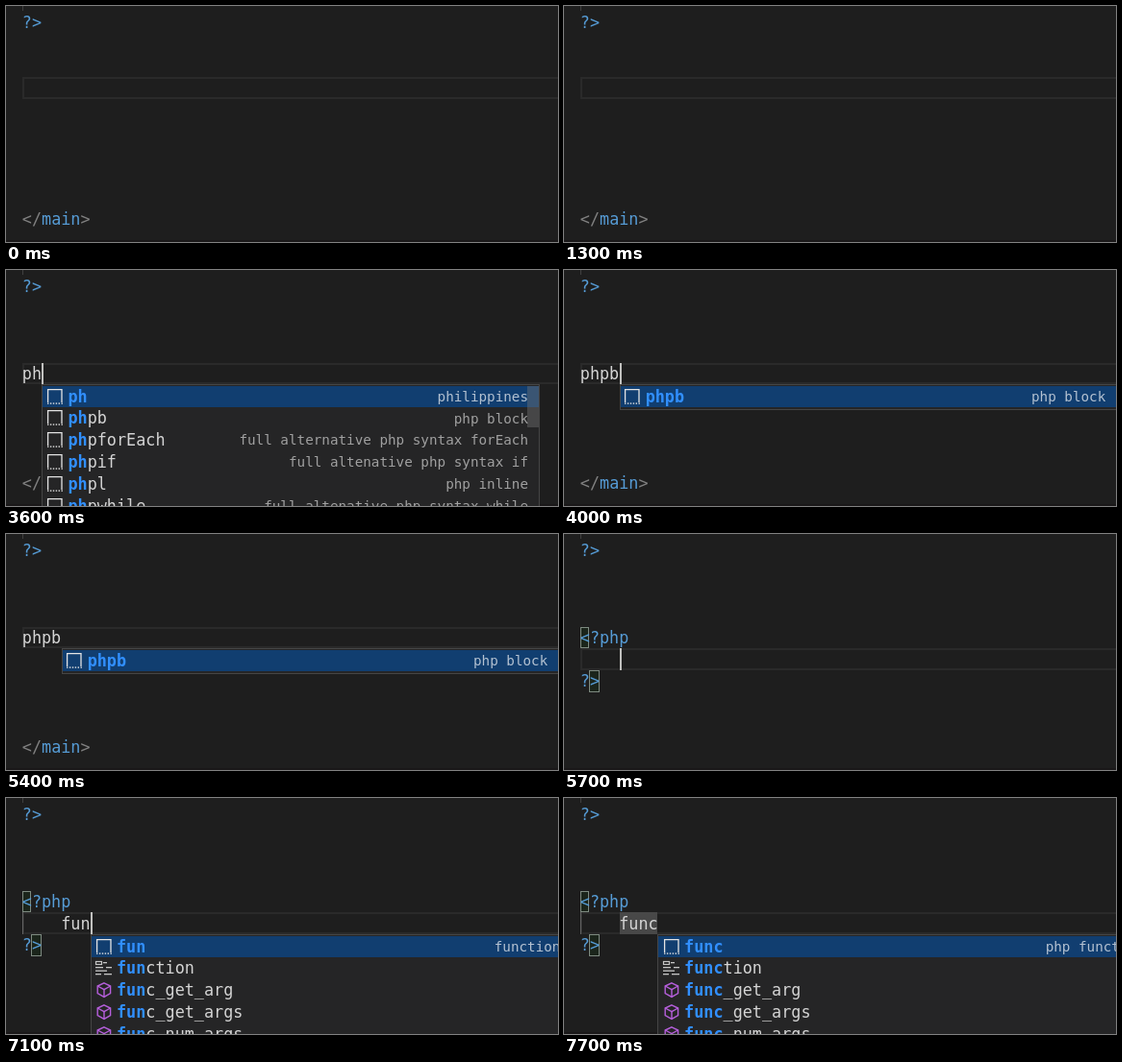
An HTML page with a canvas that plays this animation: 574 px wide and 246 px high, repeating every 8000 ms.

```html
<!DOCTYPE html>
<html lang="en">
<head>
<meta charset="utf-8">
<title>Editor snippets</title>
<style>
  html, body { margin: 0; width: 100%; height: 100%; overflow: hidden; background: #1e1e1e; }
  canvas { display: block; }
</style>
</head>
<body>
<canvas id="stage" width="574" height="246"></canvas>
<script>
const W = 574, H = 246, LOOP = 8000;
const ctx = document.getElementById('stage').getContext('2d');

const SIZE = 16.8, ADV = SIZE * 0.602, LINE = 22.8, LEFT = 16.8, TOP = 5.4;
const FAMILY = '"DejaVu Sans Mono", monospace';
const BLUE = '#569cd6', GREY = '#808080', TEXT = '#d4d4d4', MATCH = '#318fff';
const CARET_X = [17, 27, 37, 47, 58, 68, 78, 88, 97];

const phpItems = [
  ['phpb', 'php block'],
  ['phpforEach', 'full alternative php syntax forEach'],
  ['phpif', 'full altenative php syntax if'],
  ['phpl', 'php inline'],
  ['phpwhile', 'full altenative php syntax while']
];
const funItems = [
  ['function', '', 'keyword'],
  ['func_get_arg', '', 'cube'],
  ['func_get_args', '', 'cube'],
  ['func_num_args', '', 'cube']
];
const phList = [['ph', 'philippines'], ...phpItems];
const funList = [['fun', 'function()'], ...funItems];
const funcList = [['func', 'php function'], ...funItems];

// Each step replaces the fields it names
const steps = [
  { at: 0, line: 3, word: '', list: null, popCol: 0, bar: false,
    block: false, pair: false, guide: false, mark: false },
  { at: 1400, line: 5 },
  { at: 2600, line: 4 },
  { at: 3500, word: 'p' },
  { at: 3600, word: 'ph', list: phList, popCol: 2, bar: true },
  { at: 3700, word: 'php' },
  { at: 3800, list: phpItems, popCol: 3, bar: false },
  { at: 4000, word: 'phpb', list: phpItems.slice(0, 1), popCol: 4 },
  { at: 5600, line: 5, word: '', list: null, block: true },
  { at: 5700, pair: true },
  { at: 6800, word: 'f', guide: true },
  { at: 6900, word: 'fu' },
  { at: 7000, list: funList, popCol: 6 },
  { at: 7100, word: 'fun', popCol: 7 },
  { at: 7300, word: 'func', list: funcList, popCol: 8 },
  { at: 7500, mark: true }
];
const blinkStarts = [1400, 2600, 3500, 3900, 5600, 6800, 7200];

const lineTop = n => Math.round(TOP + n * LINE);

function rect(x, y, w, h, color) {
  ctx.fillStyle = color;
  ctx.fillRect(x, y, w, h);
}

function frame(x, y, w, h, color) {
  ctx.strokeStyle = color;
  ctx.lineWidth = 1;
  ctx.strokeRect(x + 0.5, y + 0.5, w - 1, h - 1);
}

function text(str, x, y, color, bold, size = SIZE) {
  ctx.font = `${bold ? 'bold ' : ''}${size}px ${FAMILY}`;
  ctx.fillStyle = color;
  ctx.fillText(str, x, Math.round(y));
}

function code(str, line, col, color) {
  text(str, LEFT + col * ADV, TOP + line * LINE + 17.2, color);
}

function poly(x, y, pts, closed) {
  ctx.beginPath();
  pts.forEach(([px, py]) => ctx.lineTo(x + px, y + py));
  if (closed) ctx.closePath();
  ctx.stroke();
}

const icons = {
  snippet(x, y) {
    ctx.strokeStyle = '#e4e4e4';
    ctx.lineWidth = 1.3;
    poly(x, y, [[0.6, 14], [0.6, 0.6], [15, 0.6], [15, 14]]);
    for (let i = 0; i < 6; i++) rect(x + i * 2.9, y + 14.4, 1.4, 1.4, '#e4e4e4');
  },
  keyword(x, y) {
    ctx.strokeStyle = '#c5c5c5';
    ctx.lineWidth = 1.2;
    ctx.strokeRect(x - 0.5, y + 1.5, 6, 3);
    [[7, 2, 4], [-1, 7, 8], [10, 7, 6], [-1, 10.5, 12], [-1, 14, 6], [8, 14, 8]]
      .forEach(([dx, dy, w]) => rect(x + dx, y + dy, w, 1.3, '#c5c5c5'));
  },
  cube(x, y) {
    ctx.strokeStyle = '#b65fdc';
    ctx.lineWidth = 1.4;
    poly(x, y, [[8, 0.8], [14.6, 4], [14.6, 11.6], [8, 15.4], [1.2, 11.6], [1.2, 4]], true);
    poly(x, y, [[1.2, 4], [8, 7.6], [14.6, 4]]);
    poly(x, y, [[8, 7.6], [8, 15.4]]);
  }
};

function popup(s) {
  const x = CARET_X[s.popCol], exact = LEFT + s.popCol * ADV;
  const y = lineTop(s.line + 1), first = y + 1.4;
  const h = Math.round(s.list.length * LINE + 4.5);
  rect(x, y, 518, h, '#252526');
  frame(x, y, 518, h, '#454545');
  rect(x + 1, y + 2, 516, 22, '#113e70');

  s.list.forEach(([label, detail, icon = 'snippet'], i) => {
    const top = first + i * LINE, base = top + 17.2;
    const typed = label.slice(0, s.popCol - (s.block ? 4 : 0));
    const lx = exact + 27.4;
    icons[icon](Math.round(exact + 6.2), Math.round(top + 3.2));
    text(typed, lx, base, MATCH, true);
    text(label.slice(typed.length), lx + typed.length * ADV, base, TEXT);
    if (detail) {
      ctx.textAlign = 'right';
      text(detail, exact + 506, top + 16.3, i ? '#a0a0a0' : '#b3c1d1', false, 14.28);
      ctx.textAlign = 'left';
    }
  });
  if (s.bar) rect(x + 505, y + 2, 12, 43, 'rgba(121,121,121,0.4)');
}

function bracketBox(line, x, w) {
  const y = lineTop(line), h = lineTop(line + 1) - y;
  rect(x, y, w, h, 'rgba(0,100,0,0.1)');
  frame(x, y, w, h, '#7d8a80');
}

function currentLine(line) {
  const y = lineTop(line), h = lineTop(line + 1) - y;
  ctx.strokeStyle = '#2a2a2a';
  ctx.lineWidth = 2;
  ctx.strokeRect(18, y + 1, W, h - 2);
}

function draw(t) {
  const s = Object.assign({}, ...steps.filter(step => step.at <= t));
  const indent = s.block ? 4 : 0;

  rect(0, 0, W, H, '#1e1e1e');
  rect(0, 244, W, 2, '#1a1819');
  rect(17, 0, 1, 5, '#404040');
  currentLine(s.line);
  if (s.mark) rect(58, lineTop(5), 39, 23, '#484848');
  if (s.guide) rect(17, lineTop(5), 1, 23, '#666666');
  if (s.pair) {
    bracketBox(4, 17, 9);
    bracketBox(6, 26, 11);
  }

  code('?>', 0, 0, BLUE);
  if (s.block) {
    code('<?php', 4, 0, BLUE);
    code('?>', 6, 0, BLUE);
  } else {
    code('</', 9, 0, GREY);
    code('main', 9, 2, BLUE);
    code('>', 9, 6, GREY);
  }
  code(s.word, s.line, indent, TEXT);

  const start = blinkStarts.filter(b => b <= t).pop();
  if (start !== undefined && (t - start) % 1000 < 500) {
    const y = lineTop(s.line);
    rect(CARET_X[indent + s.word.length], y, 2, lineTop(s.line + 1) - y, '#c0c0be');
  }
  if (s.list) popup(s);
}

function tick(now) {
  draw(now % LOOP);
  requestAnimationFrame(tick);
}
draw(0);
requestAnimationFrame(tick);
</script>
</body>
</html>
```
